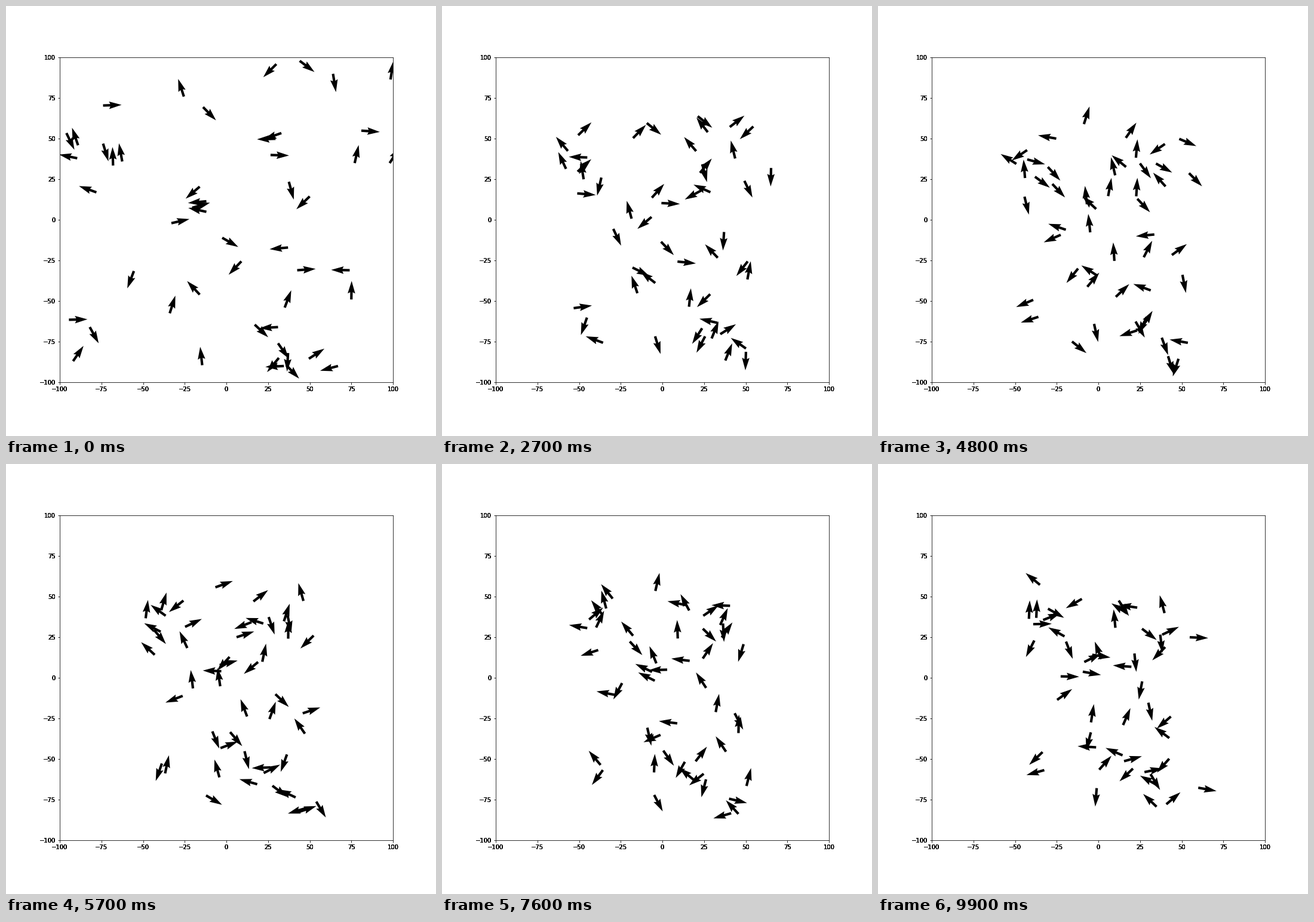
Recreate the animation shown at these times as a matplotlib script. Size 720x720 px, loop 10 s.

```python
import numpy as np
import matplotlib.pyplot as plt
from matplotlib.animation import FuncAnimation

FRAMES = 100
SPEED = 1.2  # wander step per tick

START = np.array([
    (30, 96), (44, 98), (64, 90), (98.5, 86.5), (-25.5, 76),
    (-14, 69.5), (-74, 70.5), (-96, 53.5), (-74, 47), (-89.5, 38),
    (-89, 46), (-62.5, 36), (-68, 33.5), (-78, 17), (29.5, 50),
    (33, 53.5), (26.5, 40), (37.5, 23.5), (50, 14.5), (81, 55),
    (77, 35), (98, 35), (-16, 20.5), (-20.5, 7.5), (-33, -2),
    (-12, 11.5), (-12, 5), (-2.5, -11), (9, -25.5), (37, -17),
    (74, -31), (75, -49), (42.5, -31), (35, -54), (-55.5, -31.5),
    (-34, -57.5), (-16, -46), (-94.5, -61.5), (-82, -66), (-92, -87),
    (-14.5, -89.5), (17, -64.5), (31, -66), (31, -76), (31.5, -85),
    (37, -82), (49.5, -85.5), (67, -90), (34.5, -90), (36, -89.5),
])


def gather(p):
    """Where the flock closes in: a blob with a tail to the lower right."""
    x, y = p.T
    mid = np.where(y < 0, -0.3 * y, 0)
    return np.column_stack([
        mid + 40 * np.tanh((x - mid) / 60),
        np.where(y < 0, 0.8 * y, 50 * np.tanh(y / 70)),
    ])


rng = np.random.default_rng(7)
turn = rng.uniform(0, 2 * np.pi, (FRAMES, len(START)))
way = np.stack([np.cos(turn), np.sin(turn)], axis=2)
wander = SPEED * (np.cumsum(way, axis=0) - way[0])
pull = 1 - np.exp(-4 * np.linspace(0, 1, FRAMES))[:, None, None]
pos = START + (gather(START) - START) * pull + wander

fig = plt.figure(figsize=(10, 10), dpi=72, facecolor="white")
ax = fig.add_axes([0.125, 0.125, 0.775, 0.755])
ax.set(xlim=(-100, 100), ylim=(-100, 100))
ticks = range(-100, 101, 25)
ax.set_xticks(ticks)
ax.set_yticks(ticks)

# Overprint the labels so their soft edges turn solid
x_tr, x_va, x_ha = ax.get_xaxis_text1_transform(7)
y_tr, y_va, y_ha = ax.get_yaxis_text1_transform(7)
for v in ticks:
    label = str(v).replace("-", "\u2212")
    for _ in range(4):
        ax.text(v, 0, label, transform=x_tr, va=x_va, ha=x_ha)
        ax.text(0, v, label, transform=y_tr, va=y_va, ha=y_ha)

arrows = ax.quiver(*pos[0].T, *way[0].T, scale=18, width=0.0075)


def update(i):
    arrows.set_offsets(pos[i])
    arrows.set_UVC(*way[i].T)
    return (arrows,)


anim = FuncAnimation(fig, update, frames=FRAMES, interval=100,
                     repeat=True, repeat_delay=0)
plt.show()
```
